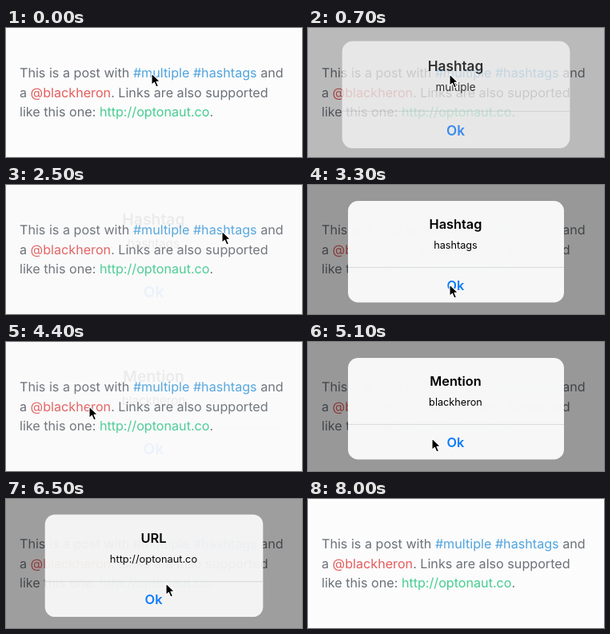
An HTML page that plays this animation: 370 px wide and 162 px high, repeating every 8.1 s.

```html
<!DOCTYPE html>
<html lang="en">
<head>
<meta charset="utf-8">
<title>Tappable links</title>
<style>
  html, body { margin: 0; width: 100%; height: 100%; overflow: hidden; background: #fcfcfc; }
  svg { display: block; width: 370px; height: 162px; font-family: Inter, Roboto, sans-serif; }
  .post { font-size: 16.15px; fill: #6b7178; text-rendering: geometricPrecision; }
  .tag { fill: #4fa3de; }
  .mention { fill: #e45c5c; }
  .url { fill: #45cc90; }
  #alert text { text-anchor: middle; }
  .bold { font-size: 16.3px; font-weight: 600; }
  #message { font-size: 12.7px; }
</style>
</head>
<body>
<svg viewBox="0 0 370 162">
  <rect width="370" height="162" fill="#fcfcfc"/>
  <g class="post">
    <text x="17" y="62.4">This is a post with <tspan class="tag">#multiple</tspan> <tspan class="tag">#hashtags</tspan> and</text>
    <text x="17" y="86.5">a <tspan class="mention">@blackheron</tspan>. Links are also supported</text>
    <text x="17" y="110.6">like this one: <tspan class="url">http://optonaut.co</tspan>.</text>
  </g>
  <rect id="dim" width="370" height="162"/>
  <g id="alert">
    <rect x="50" y="20" width="270" height="127.5" rx="12.5" fill="#f9f9f9" fill-opacity=".98"/>
    <path d="M50 103.5H320" stroke="#d9dcdd"/>
    <text id="title" class="bold" x="184.5" y="55.3"></text>
    <text id="message" x="184.5" y="79.6"></text>
    <text class="bold" x="184.5" y="132" fill="#0b7bff">Ok</text>
  </g>
  <path id="cursor" d="M0 0V14.5L3.4 11.4L5.8 17L8.4 15.9L6 10.4H10.6Z" stroke="#fff" stroke-width="1.1" stroke-linejoin="round"/>
</svg>
<script>
const LOOP = 8100, STEP = 100;
const FIRST = 600, PERIOD = 1900, HOLD = 900;
const SPRING = 0.022, LEAD = 17;
const $ = id => document.getElementById(id);
const [dim, alertBox, title, message, cursor] =
  ['dim', 'alert', 'title', 'message', 'cursor'].map($);
const point = (x, y) => ({ x, y });

// link and ok are the places the cursor taps
const alerts = [
  { title: 'Hashtag', message: 'multiple', link: point(177, 58), ok: point(184, 121) },
  { title: 'Hashtag', message: 'hashtags', link: point(270, 58), ok: point(177, 125), hold: HOLD + STEP },
  { title: 'Mention', message: 'blackheron', link: point(104, 81), ok: point(155, 121) },
  { title: 'URL', message: 'http://optonaut.co', link: point(200, 106), ok: point(186, 122) },
];
alerts.forEach((a, i) => {
  a.show = FIRST + PERIOD * i;
  a.hide = a.show + (a.hold || HOLD);
});

const entry = point(182, 57), exit = point(200, 175);
const legs = [{ to: alerts[0].link, from: 0, until: STEP }];
alerts.forEach((a, i) => {
  const next = alerts[i + 1];
  legs.push({ to: a.ok, from: a.show + 200, until: a.show + 700 });
  legs.push({ to: next ? next.link : exit, from: a.hide, until: a.hide + (next ? 600 : 400) });
});

// Share of the distance left in a critically damped spring
const remaining = ms => (1 + SPRING * ms) * Math.exp(-SPRING * ms);
const smooth = k => k * k * (3 - 2 * k);
const clamp = k => Math.min(1, Math.max(0, k));

function cursorAt(t) {
  return legs.reduce((p, leg) => {
    const k = smooth(clamp((t - leg.from) / (leg.until - leg.from)));
    return point(p.x + (leg.to.x - p.x) * k, p.y + (leg.to.y - p.y) * k);
  }, entry);
}

function drawAlert(t) {
  const item = alerts.find(a => t >= a.show && t < a.hide + 500);
  let shown = 0, scale = 1;
  if (item) {
    title.textContent = item.title;
    message.textContent = item.message;
    if (t < item.hide) {
      const left = remaining(t - item.show + LEAD);
      shown = 1 - left;
      scale = 1 + 0.2 * left;
    } else {
      shown = remaining(t - item.hide + LEAD);
    }
  }
  dim.setAttribute('opacity', 0.4 * shown ** 1.3);
  alertBox.setAttribute('opacity', shown);
  alertBox.setAttribute('transform',
    `translate(184.5 83.5) scale(${scale}) translate(-184.5 -83.5)`);
}

function draw(time) {
  const t = Math.floor((time % LOOP) / STEP) * STEP;
  const tip = cursorAt(t);
  drawAlert(t);
  cursor.setAttribute('transform', `translate(${tip.x} ${tip.y})`);
}

const start = performance.now();
function tick() {
  draw(performance.now() - start);
  requestAnimationFrame(tick);
}
tick();
</script>
</body>
</html>
```
